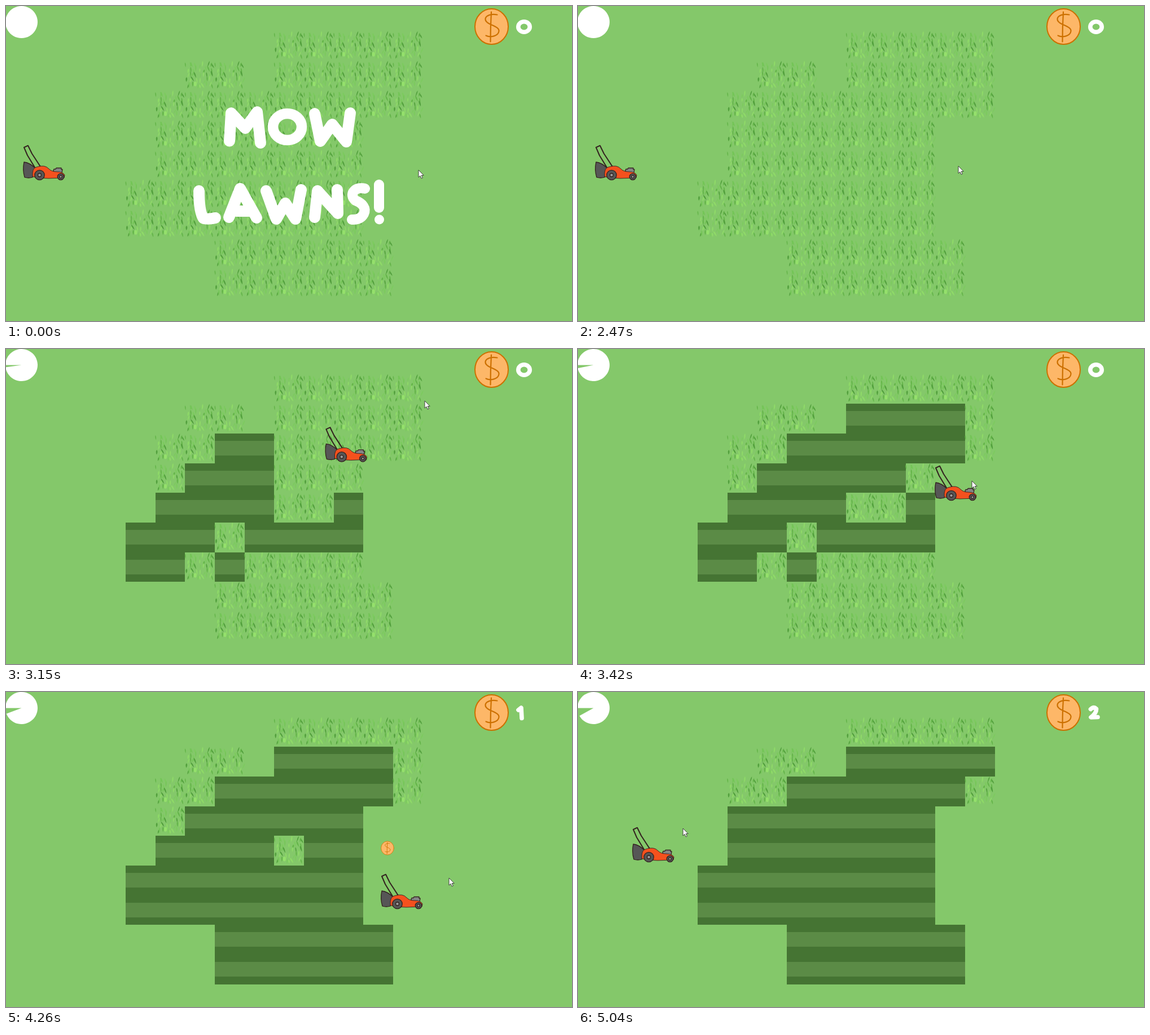
These frames come from a looping animation (1003 by 559 pixels, 5110 ms). An HTML page:

```html
<!DOCTYPE html>
<html lang="en">
<head>
<meta charset="utf-8">
<title>Mow Lawns!</title>
<style>
  html, body { margin: 0; width: 100%; height: 100%; overflow: hidden; background: #84c86a; }
  svg { display: block; width: 100vw; height: 100vh; }
  .brush { fill: none; stroke: #fff; stroke-linecap: round; stroke-linejoin: round; }
  .ink { stroke: #33211f; stroke-width: 1.3; stroke-linejoin: round; stroke-linecap: round; }
  .turf { shape-rendering: crispEdges; }
</style>
</head>
<body>
<svg id="stage" viewBox="0 0 1003 559" preserveAspectRatio="none">
  <defs>
    <g id="grass"></g>
    <g id="turf" class="turf">
      <rect width="52.670" height="52.670" fill="#457433"/>
      <rect y="13" width="52.670" height="26" fill="#5b8b46"/>
    </g>
    <g id="coin" stroke="#cc7000" stroke-linecap="round">
      <ellipse rx="29.500" ry="31.500" fill="#fdb768" stroke-width="2"/>
      <path d="M10-21C0-23-11-20-11-13C-11-3 14-2 13 8C12 17-2 20-10 16M-.5-26Q-2 0-2 27" fill="none" stroke-width="2.200"/>
    </g>
  </defs>

  <g id="lawn"></g>
  <g id="coins"></g>

  <g id="mower" class="ink">
    <path d="M21 41L7 18L1 4L8 .7L15 15L30 38" fill="none" stroke-width="2"/>
    <path d="M1 30Q11 31 21 41L16 57Q9 59 2 57Q-2 44 1 30Z" fill="#565656"/>
    <path d="M53 44.500L54 42.500H57L58 40.500H67V43H69L68 49H54Z" fill="#858585"/>
    <path d="M16 54Q15 40 24 38.500Q38 34 45 42Q50 47 58 47Q70 47 73 53L72 58L44 59Q30 59 17 56Z" fill="#f4511e" stroke-width=".9"/>
    <circle cx="28.500" cy="53" r="8.700" fill="#565656"/>
    <circle cx="28.500" cy="53" r="3" fill="#999"/>
    <circle cx="66" cy="56" r="5.700" fill="#565656"/>
    <circle cx="66" cy="56" r="2.300" fill="#999"/>
  </g>

  <path id="timer" fill="#fff"/>
  <use href="#coin" x="860.500" y="36.500"/>
  <g id="score" class="brush" stroke-width="7.600">
    <ellipse cx="918" cy="37" rx="10.200" ry="9.200" aria-label="0"/>
    <path d="M908 32L913 28L914 46.500" aria-label="1"/>
    <path d="M908.500 30.500Q914 25.500 918.500 30Q919 37 909 45L921 44.500" aria-label="2"/>
  </g>

  <g id="title" class="brush" stroke-width="20" role="img" aria-label="MOW LAWNS!">
    <path d="M396 239.500L399 190L424 217L445 188L451 243"/>
    <ellipse cx="498.500" cy="214.500" rx="25.500" ry="23.500" stroke-width="18.500"/>
    <path d="M547 191L557 240L578 210L603 241L610 190"/>
    <path d="M342 328C342 349 344 368 350 377Q360 379 371 376"/>
    <path d="M395 375L415 324L444 376M408 364H432"/>
    <path d="M461 328L479 378L495 350L513 378L523 326"/>
    <path d="M547 375L552 328L588 368L587 326"/>
    <path d="M636 324C618 320 607 334 619 345C632 350 639 359 634 369Q628 380 613 379" stroke-width="18"/>
    <path d="M661 317V358" stroke-width="18"/>
    <path d="M661.500 379V379.100" stroke-width="17"/>
  </g>

  <path id="cursor" d="M0 0V13L3 10.300L5.200 15L7.300 14L5.200 9.500H9.200Z"
    fill="#fff" stroke="#333" stroke-width=".9"/>
</svg>
<script>
  const $ = id => document.getElementById(id);
  const LOOP = 5110, START = 2470, TICK = 69.46, LAST = 37, CELL = 52.67;

  // One mark per cell: the sweep that mows it, 0 for never, dot for no cell
  const field = [
    '.....00000',
    '..00.22225',
    '.002222220',
    '.5222223',
    '.2222531',
    '22232111',
    '11313334',
    '...344444',
    '...444444'
  ];
  // First tick of each sweep; odd sweeps run leftwards
  const sweeps = [0, 1, 8, 15, 20, 30], SWEEP = 4;

  // Tick, x, y
  const route = [
    [0, 31, 247], [1, 582, 287], [3, 430, 310], [5.5, 180, 355], [7, 284, 280], [8, 399, 225],
    [11, 650, 95], [14, 633, 207], [15, 606, 237], [18, 150, 450], [19, 144, 465], [20, 259, 468],
    [24, 680, 400], [26, 665, 323], [27, 693, 333], [30, 740, 100], [35, 150, 225], [37, 97, 240], [38, 94, 245]
  ];
  // Milliseconds, x, y of the waiting cursor
  const idle = [[790, 731, 291], [1140, 684, 281], [1470, 679, 276], [2130, 679, 276], [2210, 674, 284]];

  const coins = [
    { from: 18, to: 24, x: 594, y: 370, scale: .475 },
    { from: 25, to: 32, x: 667.4, y: 288.2, scale: .385 }
  ];

  function add(parent, tag, attrs) {
    const el = document.createElementNS('http://www.w3.org/2000/svg', tag);
    for (const name in attrs) el.setAttribute(name, attrs[name]);
    return parent.appendChild(el);
  }
  const place = (el, x, y, scale = 1) =>
    el.setAttribute('transform', `translate(${x} ${y}) scale(${scale})`);
  const show = (el, on) => el.style.display = on ? '' : 'none';
  const mix = (a, b, u) => a + (b - a) * u;
  const progress = (a, b, k) => Math.max(0, Math.min(1, (k - a) / (b - a)));

  function along(path, k) {
    let i = 1;
    while (i < path.length - 1 && path[i][0] < k) i++;
    const [a, ax, ay] = path[i - 1], [b, bx, by] = path[i];
    const u = progress(a, b, k);
    return [mix(ax, bx, u), mix(ay, by, u)];
  }

  let seed = 11;
  const random = () => (seed = seed * 16807 % 2147483647) / 2147483647;
  const between = (a, b) => mix(a, b, random());

  function growGrass() {
    const tones = ['#8fda68', '#74c557', '#7ccb5e', '#529f3d', '#65b54a'];
    for (let i = 0; i < 45; i++) {
      const x = 3 + i % 9 * 5.8 + between(-2, 2);
      const y = 12 + Math.floor(i / 9) * 9 + between(-2.5, 2);
      const h = between(7, 12), w = between(1.8, 3);
      add($('grass'), 'path', {
        d: `M0 0Q${-w} ${-h * .7} 0 ${-h}Q${w} ${-h * .6} 0 0`,
        fill: tones[Math.floor(random() * tones.length)],
        transform: `translate(${x} ${y}) rotate(${between(-32, 32)})`
      });
    }
    add($('grass'), 'ellipse', { cx: 18, cy: 41, rx: 2.6, ry: 4.2, fill: '#94e06b' });
  }
  growGrass();

  function mowTick(mark, col) {
    if (mark === '0') return Infinity;
    return sweeps[mark] + SWEEP * (mark % 2 ? 1 - col / 9 : col / 9);
  }

  const cells = [];
  field.forEach((row, r) => [...row].forEach((mark, c) => {
    if (mark === '.') return;
    const pos = { x: 212 + c * CELL, y: 44.6 + r * CELL };
    cells.push({
      due: mowTick(mark, c),
      grass: add($('lawn'), 'use', { href: '#grass', ...pos }),
      turf: add($('lawn'), 'use', { href: '#turf', ...pos })
    });
  }));
  for (const coin of coins) coin.el = add($('coins'), 'use', { href: '#coin' });

  // The tiny minimum angle keeps the full disc a valid arc
  function drawTimer(degrees) {
    const x = 27.5, y = 28.5, r = 28.5, a = Math.max(degrees, .01) * Math.PI / 180;
    $('timer').setAttribute('d',
      `M${x} ${y}H${x - r}A${r} ${r} 0 1 1 ${x - r * Math.cos(a)} ${y + r * Math.sin(a)}Z`);
  }

  function draw(t) {
    const playing = t >= START;
    const k = playing ? Math.min(LAST, Math.floor((t - START) / TICK + .4)) : -1;

    show($('title'), !playing);
    for (const { due, grass, turf } of cells) {
      show(grass, k < due);
      show(turf, k >= due);
    }

    // The cursor leads the mower by one tick
    place($('mower'), ...along(route, k));
    const [x, y] = along(route, k + 1);
    place($('cursor'), ...(playing ? [x + 92, y - 3] : along(idle, t)));

    for (const { el, from, to, x, y, scale } of coins) {
      const u = progress(from, to, k) ** 1.6;
      show(el, k >= from && k < to);
      place(el, mix(x, 860, u), mix(y, 36, u), scale);
    }
    const score = coins.filter(coin => k >= coin.to).length;
    [...$('score').children].forEach((digit, i) => show(digit, i === score));

    drawTimer(playing ? (k + .1) * .785 : 0);
  }

  const begin = performance.now();
  function loop() {
    draw((performance.now() - begin) % LOOP);
    requestAnimationFrame(loop);
  }
  loop();
</script>
</body>
</html>
```
